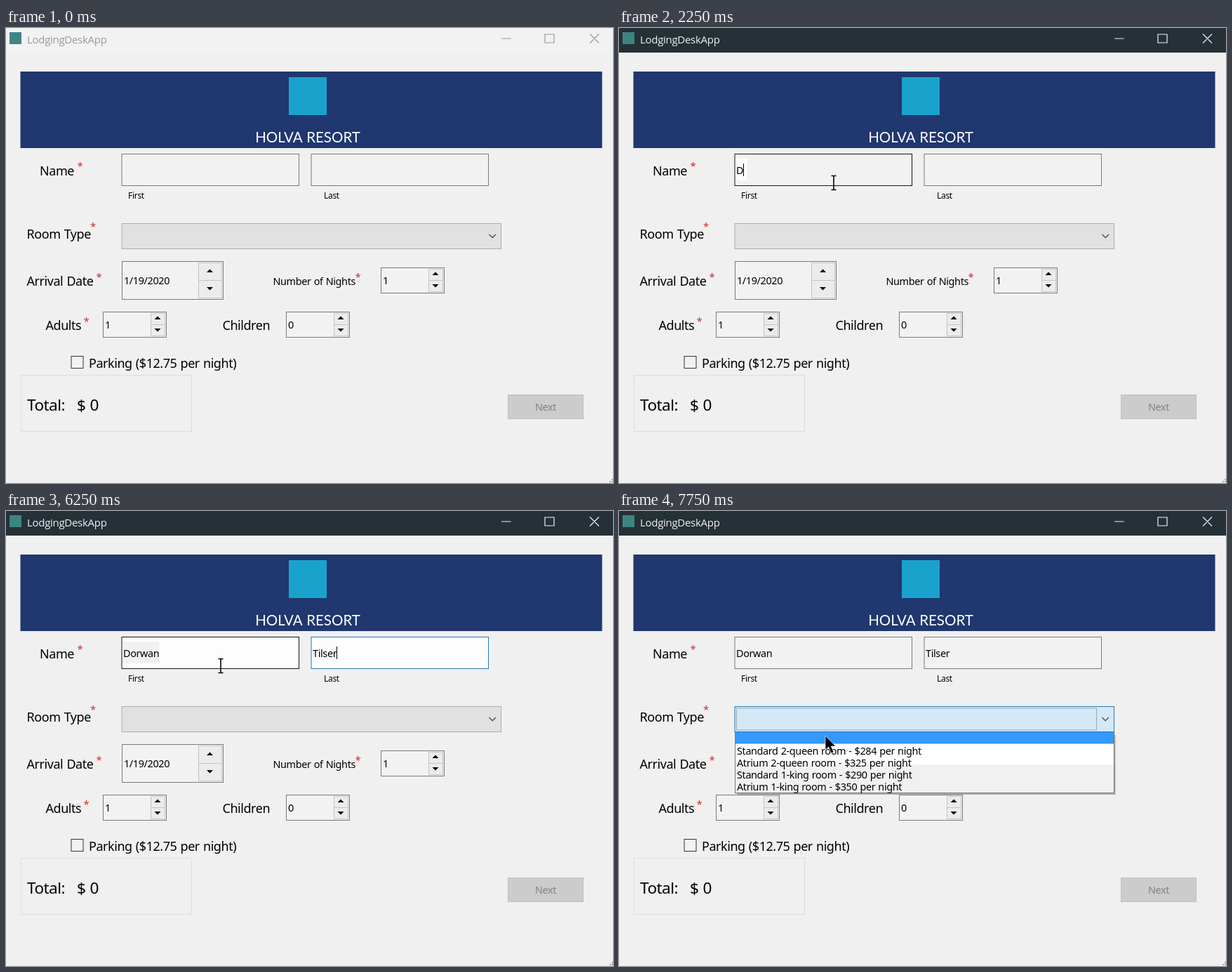
An HTML page for the animation above (8000 ms loop, 865 by 648 pixels).

```html
<!DOCTYPE html>
<html lang="en">
<head>
<meta charset="utf-8">
<title>Reservation form</title>
<style>
html, body { margin: 0; width: 100%; height: 100%; overflow: hidden; background: #f0f0f0; }
svg { display: block; width: 865px; height: 648px; }
text { font-family: "Noto Sans", "Open Sans", sans-serif; font-size: 18px; letter-spacing: -.025em; word-spacing: .05em; fill: #000; white-space: pre; }
text.field { font-size: 14.4px; }
text.small { font-size: 12px; }
text.total { font-size: 22.6px; }
text.star { font-size: 15px; fill: #d9262c; text-anchor: middle; }
text.brand { font-family: Lato, sans-serif; font-size: 20.5px; letter-spacing: 0; fill: #fff; text-anchor: middle; }
text.title { font-family: "Open Sans", "Noto Sans", sans-serif; font-size: 15px; letter-spacing: -.02em; fill: inherit; }
.edge { stroke: #7a7a7a; fill: #f2f2f2; }
.button { stroke: #c4c4c4; fill: #ececec; }
</style>
</head>
<body>
<svg id="stage" viewBox="0 0 865 648">
  <rect width="865" height="648" fill="#f0f0f0"/>
  <rect id="bar" width="865" height="35"/>
  <rect x="5" y="6" width="17" height="17" fill="#3c8583"/>
  <g id="chrome">
    <text class="title" x="30" y="22">LodgingDeskApp</text>
    <path id="controls" fill="none" stroke-width="1.2" d="M706 15h13.5M768 9h13v12h-13zM832 8.5l13 13M845 8.5l-13 13"/>
  </g>
  <rect x="20.5" y="62" width="829" height="109" fill="#20376f"/>
  <rect x="403" y="70" width="54" height="54" fill="#19a3cc"/>
  <text class="brand" x="430" y="162.5">HOLVA RESORT</text>

  <rect id="firstBox" class="edge" x="165" y="179.5" width="252.5" height="45"/>
  <rect id="lastBox" class="edge" x="435" y="179.5" width="252.5" height="45"/>
  <rect id="patch" x="166" y="186" height="31"/>
  <text id="first" class="field" x="167" y="207.5"></text>
  <text id="last" class="field" x="437" y="207.5"></text>
  <rect id="caret" y="193" width="1" height="18" fill="#000"/>

  <g id="combo">
    <rect id="comboBox" x="165" y="278.5" width="540.5" height="36"/>
    <path id="comboFocus" fill="none" stroke="#5a6b78" stroke-dasharray="1 1" d="M167.5 281h513v31h-513z"/>
    <path fill="none" stroke="#444" stroke-width="1.3" d="M688.5 294l4.7 4.7 4.7-4.7"/>
  </g>
  <g id="form"></g>

  <rect x="93" y="467.5" width="17" height="17" fill="#f2f2f2" stroke="#333"/>
  <rect x="21.5" y="494.5" width="243" height="80" fill="none" stroke="#dcdcdc"/>
  <rect x="715.5" y="522.5" width="107" height="34" fill="#ccc" stroke="#bfbfbf"/>
  <text class="field" x="754" y="545" style="fill:#838383">Next</text>
  <path fill="#a8a8a8" d="M863 642h2v2h-2zM860 645h2v2h-2zM863 645h2v2h-2z"/>

  <g id="list">
    <path fill="#8d8d8d" opacity=".65" d="M168 319h539.5v85H168z"/>
    <rect x="165.5" y="315.5" width="540" height="86" fill="#f1f1f1" stroke="#777"/>
    <path fill="#fff" d="M166 331h539v30H166z"/>
    <path fill="#3399ff" d="M165.5 315h539.5v16.5H165.5z"/>
  </g>

  <path id="beam" fill="none" stroke="#000" stroke-width="1.6" d="M-3.5-10h2.5q1 0 1 1v18q0 1-1 1h-2.5M3.5-10h-2.5q-1 0-1 1M3.5 10h-2.5q-1 0-1-1"/>
  <path id="arrow" fill="#000" stroke="#fff" stroke-width=".7" d="M0 0v20.5l4.6-4.4 3.9 9 3.5-1.5-3.8-8.6h6.6z"/>
</svg>
<script>
const $ = id => document.getElementById(id);

function add(parent, name, attrs, content = '') {
  const node = document.createElementNS('http://www.w3.org/2000/svg', name);
  for (const key in attrs) node.setAttribute(key, attrs[key]);
  node.textContent = content;
  return parent.appendChild(node);
}

function set(id, attrs) {
  for (const key in attrs) $(id).setAttribute(key, attrs[key]);
}

const show = (id, on) => { $(id).style.display = on ? '' : 'none'; };
const label = (x, y, content, kind = '', parent = $('form')) =>
  add(parent, 'text', { x, y, class: kind }, content);

function spinBox(x, y, w, h, buttonX, buttonW, value) {
  const form = $('form');
  add(form, 'rect', { class: 'edge', x: x + .5, y: y + .5, width: w, height: h });
  const half = (h - 3) / 2, cx = buttonX + buttonW / 2;
  [0, 1].forEach(down => {
    const top = y + 2 + down * half;
    add(form, 'rect', { class: 'button', x: buttonX + .5, y: Math.floor(top) + .5, width: buttonW, height: Math.floor(half) });
    const dir = down ? -1 : 1, cy = Math.round(top + half / 2) - 1;
    add(form, 'path', { d: `M${cx - 4.5} ${cy + 2 * dir}h9l-4.5 ${-4.5 * dir}z` });
  });
  label(x + 3, y + h / 2 + 5.5, value, 'field');
}

[[48, 209.5, 'Name'], [29.5, 300, 'Room Type'], [29.5, 367, 'Arrival Date'],
 [56.5, 429.5, 'Adults'], [308.5, 430, 'Children'], [118, 484, 'Parking ($12.75 per night)'],
 [380.5, 365.5, 'Number of Nights', 'field'],
 [174, 243, 'First', 'small'], [453, 243, 'Last', 'small'],
 [30, 544.5, 'Total:', 'total'], [101, 544.5, '$', 'total'], [119.5, 544.5, '0', 'total']
].forEach(item => label(...item));

[[105.5, 191], [124, 277], [132.5, 349], [114.5, 412], [501.5, 349]]
  .forEach(([x, y]) => label(x, y + 10.5, '*', 'star'));

spinBox(165, 332, 144, 54, 274, 33, '1/19/2020');
spinBox(534, 341, 90, 36, 602, 20, '1');
spinBox(138, 404, 90, 36, 206, 20, '1');
spinBox(399, 404, 90, 36, 467, 20, '0');

['Standard 2-queen room - $284', 'Atrium 2-queen room - $325',
 'Standard 1-king room - $290', 'Atrium 1-king room - $350'
].forEach((room, i) => label(168, 346.5 + i * 17.1, room + ' per night', 'field', $('list')));

const FIRST = 'Dorwan', LAST = 'Tilser', LOOP = 8000;

// Each step changes only the listed parts of the state.
const steps = [
  [0, { active: false, first: 0, last: 0, focus: '', hover: '', caret: false, pointer: '', x: 0, y: 0 }],
  [250, { pointer: 'arrow', x: 345, y: 382 }],
  [500, { x: 322, y: 300 }],
  [750, { pointer: 'beam', x: 306, y: 220.5, hover: 'first' }],
  [1000, { active: true, focus: 'first', caret: true }],
  [1500, { caret: false }],
  [2000, { caret: true }],
  [2250, { first: 1 }], [2500, { first: 2 }], [2750, { first: 3 }],
  [3000, { first: 4 }], [3250, { first: 5 }], [3500, { first: 6 }],
  [4000, { focus: 'last' }],
  [4500, { caret: false }],
  [4750, { caret: true, last: 1 }], [5000, { last: 2 }], [5250, { last: 3 }],
  [5500, { last: 4 }], [6000, { last: 5 }], [6250, { last: 6 }],
  [6750, { caret: false, hover: '', pointer: 'arrow', x: 298, y: 250 }],
  [7000, { hover: 'combo', x: 295, y: 284 }],
  [7250, { caret: true, x: 294, y: 291 }],
  [7500, { focus: 'combo', caret: false }],
  [7750, { y: 320 }]
];

function draw(time) {
  const s = Object.assign({}, ...steps.filter(([at]) => at <= time).map(([, part]) => part));
  const overField = s.hover === 'first', open = s.focus === 'combo';
  const tabbed = s.focus === 'last';

  set('bar', { fill: s.active ? '#253037' : '#f2f2f2' });
  set('chrome', { fill: s.active ? '#f0f0f0' : '#999' });
  set('controls', { stroke: s.active ? '#f0f0f0' : '#999' });

  const paper = tabbed ? (overField ? '#fdfdfd' : '#f6f6f6') : '#f2f2f2';
  $('firstBox').style.cssText = `fill:${paper};stroke:${overField ? '#171717' : '#7a7a7a'}`;
  $('lastBox').style.cssText = `fill:${paper};stroke:${tabbed ? '#2479b5' : '#7a7a7a'}`;

  $('first').textContent = FIRST.slice(0, s.first);
  $('last').textContent = LAST.slice(0, s.last);
  const textEnd = (id, x, count) => x + (count ? $(id).getComputedTextLength() : 0);
  const firstEnd = textEnd('first', 167, s.first);
  show('patch', s.first && overField);
  set('patch', { width: firstEnd - 166 + (tabbed ? 0 : 5), fill: tabbed ? '#f1f1f1' : '#fdfdfd' });
  show('caret', s.caret);
  set('caret', { x: Math.round(tabbed ? textEnd('last', 437, s.last) : firstEnd) });

  const lit = s.hover === 'combo';
  set('comboBox', {
    fill: open ? '#d5e8f7' : lit ? '#e3eff9' : '#e1e1e1',
    stroke: lit ? '#2479b5' : '#adadad'
  });
  show('comboFocus', open);
  show('list', open);

  for (const id of ['arrow', 'beam']) {
    show(id, s.pointer === id);
    set(id, { transform: `translate(${s.x} ${s.y})` });
  }
}

const start = performance.now();
function tick() {
  draw((performance.now() - start) % LOOP);
  requestAnimationFrame(tick);
}
tick();
</script>
</body>
</html>
```
